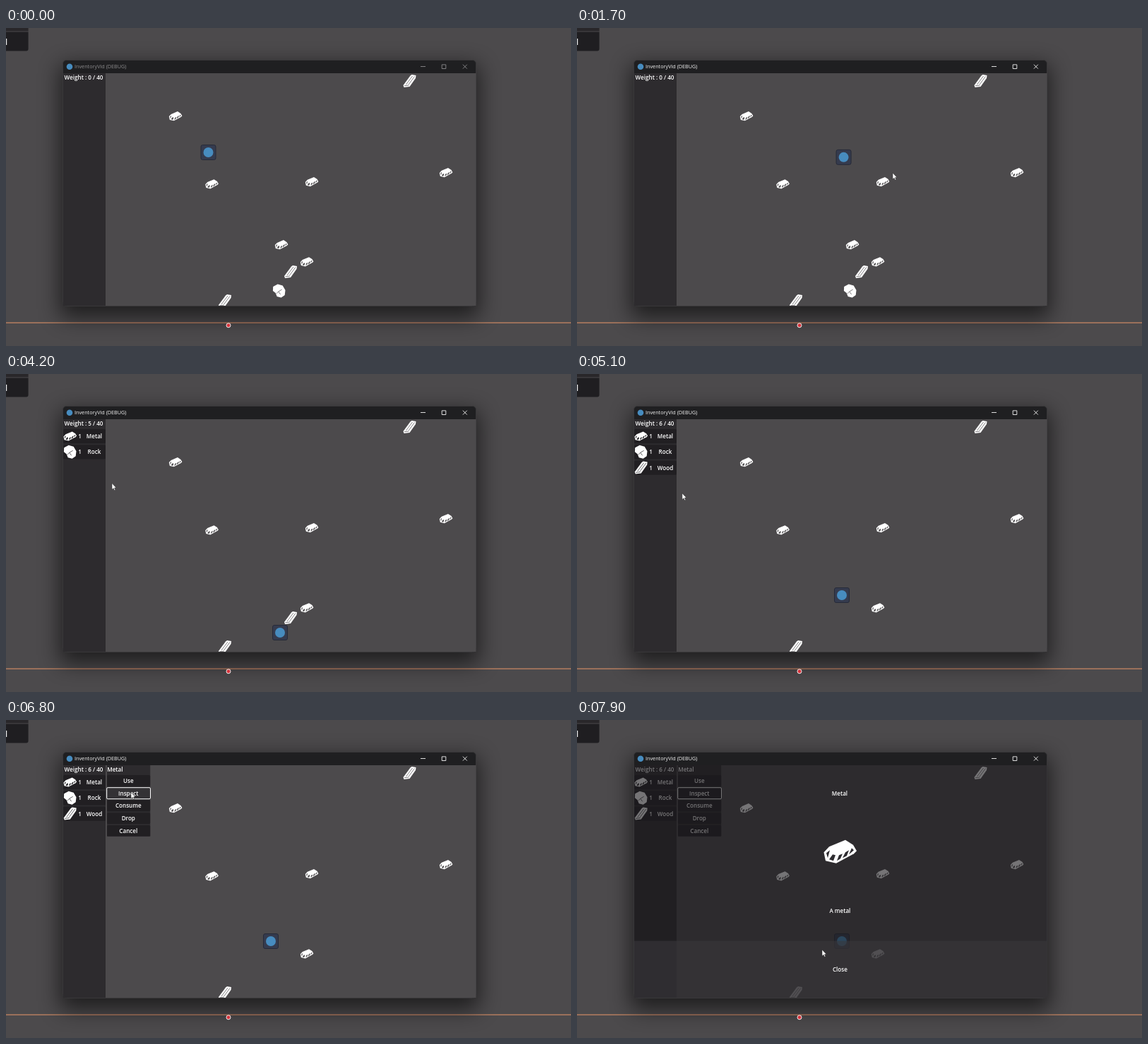
Recreate the animation shown at these times as an HTML page. Size 800 by 450 pixels, loop 8 s.

```html
<!DOCTYPE html>
<html lang="en">
<head>
<meta charset="utf-8">
<title>Inventory demo</title>
<style>
html, body { margin: 0; width: 100%; height: 100%; overflow: hidden; background: #4c4a4c; }
svg { display: block; width: 800px; height: 450px; }
text { font: 600 8.11px "Open Sans", sans-serif; fill: #fff; }
.mid { text-anchor: middle; }
.panel { fill: #1a181c; fill-opacity: .6; }
.hover { fill: #39373b; }
.white { fill: #fff; }
.ink { fill: var(--ink); }
.line { fill: none; stroke: var(--ink); stroke-width: .7; }
#shadow { filter: blur(15px); opacity: .58; }
#bar { color: #f4f4f4; }
#bar.idle { color: #8d8c8e; }
#bar text { font-weight: 500; font-size: 7.25px; fill: currentColor; }
#bar path { fill: none; stroke: currentColor; stroke-width: .9; }
</style>
</head>
<body>
<svg viewBox="0 0 800 450" xmlns="http://www.w3.org/2000/svg">
  <defs>
    <g id="metal" transform="scale(.4) translate(-23.5 -17)">
      <path class="white" d="M.5 18L8 10L31 .5L42 7.5L47 16L43 20L18 33.5L3 30Z"/>
      <path class="ink" d="M4 19L9 15L6 26ZM13 21L8 28L14 30L17 22ZM22 22L27 20L24 27L19 30ZM31 18L36 15L33 23L27 26ZM40 12L43 15L36 21Z"/>
    </g>
    <g id="wood">
      <path class="white" d="M-9 6L1-7.5L3-9L9-8L8.5-4L0 8L-8 9Z"/>
      <path class="line" d="M-5 5L4-7M-1.5 5L7-6.5M-7.5 6.8L-1 6"/>
    </g>
    <g id="rock">
      <path class="white" d="M-8.5-6L-2-9.5L5-7.5L8.8-1L8 6L3 9.5L-3 8L-5 3L-8.8 0Z"/>
      <path class="line" d="M-4 4L-1 1L4-2M-1 1L2 5"/>
    </g>
    <clipPath id="view"><rect x="81" y="64" width="584.5" height="329"/></clipPath>
  </defs>

  <rect width="800" height="450" fill="#4c4a4c"/>
  <path d="M0 0H31.6V4.5H0Z" fill="#29272a"/>
  <path d="M0 5.5H31.6V29.5a3 3 0 0 1-3 3H0Z" fill="#1f1e21"/>
  <rect y="15" width="1.2" height="9" fill="#eee"/>
  <rect y="416.4" width="800" height="1.5" fill="#b57e60"/>
  <rect id="shadow" x="76" y="52" width="594" height="358" rx="8"/>
  <circle cx="315" cy="420.8" r="3" fill="#d8343c" stroke="#eee"/>

  <rect x="80.5" y="45.5" width="585" height="348" rx="5" fill="#1f1f21" stroke="#39383a"/>
  <g id="bar">
    <circle cx="90" cy="54.7" r="4.3" fill="#478cbf"/>
    <text x="97" y="57.3">InventoryVid (DEBUG)</text>
    <path d="M587 54.5H594M617.2 51.9H622.8V57.5H617.2ZM646.9 51.7L652.8 57.6M652.8 51.7L646.9 57.6"/>
  </g>

  <g clip-path="url(#view)">
    <rect x="81" y="64" width="585" height="330" fill="#4c4a4c"/>
    <g id="world" style="--ink:#4c4a4c"></g>
    <g id="player">
      <rect x="-10.5" y="-10.5" width="21" height="21" rx="2.5" fill="#353b4e" stroke="#262a38"/>
      <circle r="7" fill="#478cbf"/>
    </g>
    <rect class="panel" x="81" y="64" width="60" height="330"/>
    <text id="weight" x="82.6" y="73.1"></text>
    <g id="rows" style="--ink:#222124"></g>
    <rect id="rowFocus" x="81" y="97.6" width="60" height="1.2" fill="#d8d8d8"/>
    <g id="menu">
      <rect class="panel" x="143" y="64" width="61.2" height="100.6"/>
      <text x="143.2" y="73.1">Metal</text>
    </g>
    <rect id="btnFocus" x="142.7" y="95.7" width="61.8" height="16" rx="1.5" fill="none" stroke="#fff"/>
    <g id="dialog" style="--ink:#2e2c30">
      <rect class="panel" x="81" y="64" width="585" height="330"/>
      <rect id="close" class="panel" x="81" y="312.6" width="585" height="82"/>
      <text class="mid" x="372" y="107.2">Metal</text>
      <use href="#metal" transform="translate(372.5 186.3) scale(2.5)"/>
      <text class="mid" x="372.4" y="272.8">A metal</text>
      <text class="mid" x="372.4" y="355.6">Close</text>
    </g>
  </g>
  <path id="cursor" d="M0 0V9L2.1 7.2L3.5 10.2L4.9 9.5L3.5 6.7L6 6.4Z" fill="#fff" stroke="#222" stroke-width=".5"/>
</svg>
<script>
const LOOP = 8000, STEP = 100, SPEED = 0.147;
const CLICK = 900, MENU = 5500, PRESS = 6800, DIALOG = 6900;
const WEIGHT = { metal: 2, rock: 3, wood: 1 };
const $ = id => document.getElementById(id);

function add(parent, tag, attrs, text) {
  const el = document.createElementNS("http://www.w3.org/2000/svg", tag);
  for (const k in attrs) el.setAttribute(k, attrs[k]);
  if (text) el.textContent = text;
  parent.append(el);
  return el;
}
const show = (el, on) => el.setAttribute("visibility", on ? "visible" : "hidden");
const place = (el, p) => el.setAttribute("transform", `translate(${p[0]} ${p[1]})`);
const smooth = k => k * k * (3 - 2 * k);

// each leg is { at, to, ms }; without ms it is walked at SPEED
function route(from, legs, ease = k => k) {
  return t => {
    let p = from;
    for (const { at, to, ms } of legs) {
      if (t < at) break;
      const [dx, dy] = [to[0] - p[0], to[1] - p[1]];
      const k = ease(Math.min(1, (t - at) / (ms ?? Math.hypot(dx, dy) / SPEED)));
      p = [p[0] + dx * k, p[1] + dy * k];
    }
    return p;
  };
}

const playerAt = route([286.5, 176], [
  { at: 1050, to: [372, 176] },
  { at: 1640, to: [385, 192] },
  { at: 1800, to: [385, 262] },
  { at: 2500, to: [385, 303] },
  { at: 3450, to: [388, 366] },
  { at: 4250, to: [396, 352] },
  { at: 4400, to: [375, 313] }
]);
const cursorAt = route([790, 413], [
  { at: 100, to: [447, 205], ms: 700 },
  { at: 2800, to: [150, 154.5], ms: 600 },
  { at: 4200, to: [152, 178], ms: 800 },
  { at: 5000, to: [122, 88], ms: 500 },
  { at: 5800, to: [158.5, 129.3], ms: 300 },
  { at: 6100, to: [177, 102.3], ms: 500 },
  { at: 7400, to: [347, 325], ms: 500 }
], smooth);

// an item is taken at the first step in which the player touches it
function touchTime(x, y) {
  for (let t = 0; t < LOOP; t += STEP) {
    const [px, py] = playerAt(t);
    if (Math.abs(px - x) < 12 && Math.abs(py - y) < 16) return t;
  }
  return Infinity;
}

const spots = {
  metal: [[240, 124.7], [291.5, 220.8], [433, 217.6], [623, 204.6], [426, 330.8], [390, 306.7]],
  wood: [[571.5, 75], [310, 386], [403, 345]],
  rock: [[386.7, 372]]
};
const items = Object.entries(spots).flatMap(([kind, list]) => list.map(([x, y]) => ({
  kind, at: touchTime(x, y), prop: add($("world"), "use", { href: "#" + kind, x, y })
})));
const bag = items.filter(i => i.at < LOOP).sort((a, b) => a.at - b.at);

bag.forEach((item, i) => {
  const y = item.y = 77.9 + i * 22.3;
  const name = item.kind[0].toUpperCase() + item.kind.slice(1);
  item.row = add($("rows"), "g", {});
  item.box = add(item.row, "rect", { class: "panel", x: 81, y, width: 60, height: 20.3, rx: 1.5 });
  add(item.row, "use", { href: "#" + item.kind, x: 90.7, y: y + 10.1 });
  add(item.row, "text", { class: "mid", x: 104.6, y: y + 13 }, "1");
  add(item.row, "text", { class: "mid", x: 125, y: y + 13 }, name);
});

const buttons = ["Use", "Inspect", "Consume", "Drop", "Cancel"].map((label, i) => {
  const y = 78.1 + i * 17.73;
  const box = add($("menu"), "rect", { class: "panel", x: 143, y, width: 61.2, height: 15.7, rx: 1.5 });
  add($("menu"), "text", { class: "mid", x: 173.3, y: y + 10.8 }, label);
  return { y, box };
});

function draw(time) {
  const t = Math.floor(time / STEP) * STEP;
  const [cx, cy] = cursorAt(t);
  const menu = t >= MENU, dialog = t >= DIALOG;
  const over = (x, y, w, h) => cx >= x && cx <= x + w && cy >= y && cy <= y + h;
  const hover = (el, on) => el.classList.toggle("hover", on);

  place($("player"), playerAt(t));
  place($("cursor"), [cx, cy]);
  show($("cursor"), t >= STEP);
  $("bar").classList.toggle("idle", t < CLICK);

  let sum = 0;
  for (const item of bag) {
    const held = t >= item.at;
    if (held) sum += WEIGHT[item.kind];
    show(item.prop, !held);
    show(item.row, held);
    hover(item.box, !dialog && over(81, item.y, 60, 20.3));
  }
  $("weight").textContent = `Weight : ${sum} / 40`;

  show($("menu"), menu);
  for (const b of buttons) hover(b.box, menu && !dialog && over(143, b.y, 61.2, 15.7));
  show($("rowFocus"), menu && t < PRESS);
  show($("btnFocus"), t >= PRESS);
  show($("dialog"), dialog);
  hover($("close"), dialog && over(81, 312.6, 585, 82));
}

let start;
function tick(now) {
  start ??= now;
  draw((now - start) % LOOP);
  requestAnimationFrame(tick);
}
draw(0);
requestAnimationFrame(tick);
</script>
</body>
</html>
```
